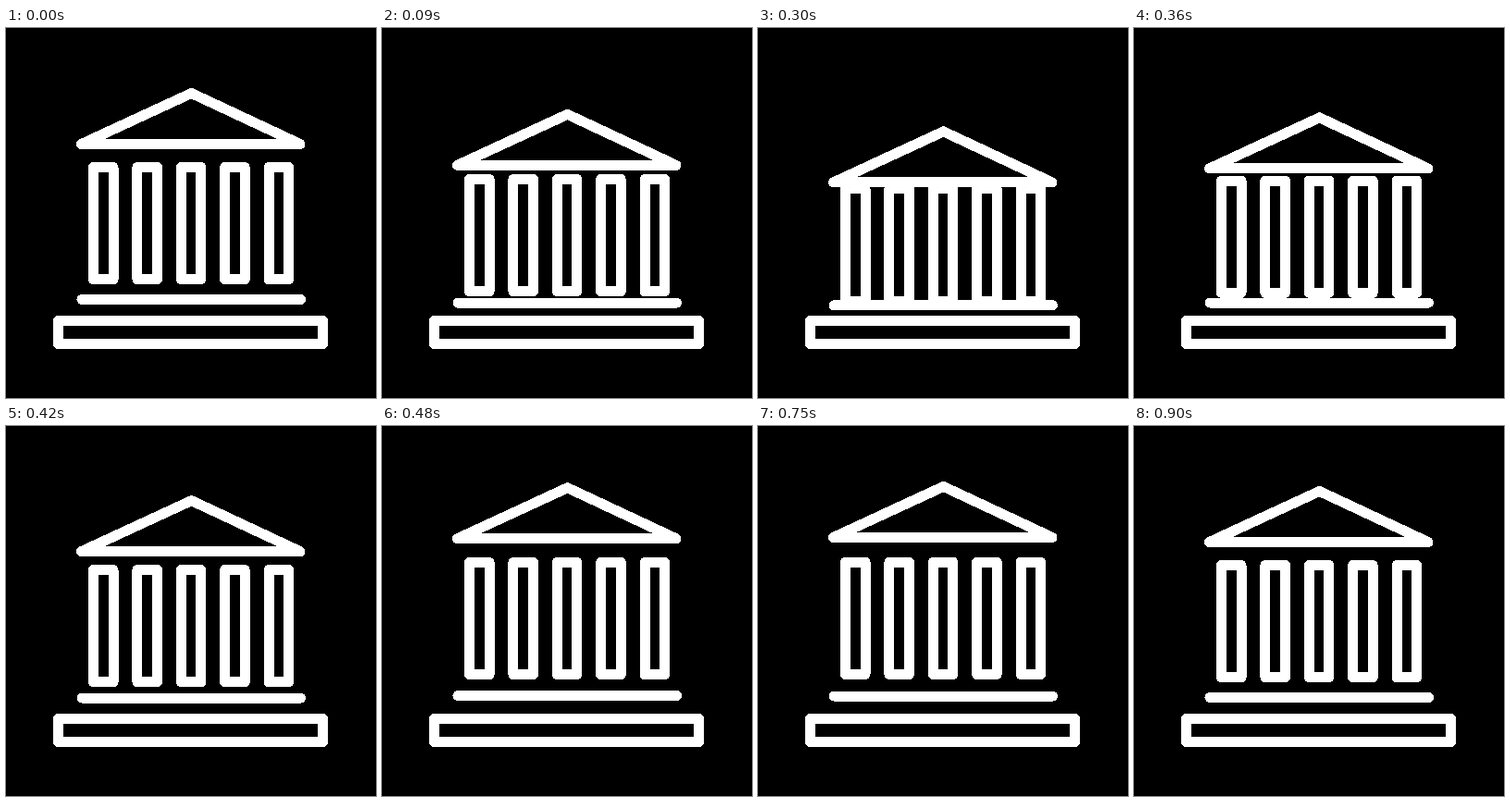
Animation, 400 px wide and 400 px high, one loop 1930 ms. Source, as an HTML page:

```html
<!DOCTYPE html>
<html lang="en">
<head>
<meta charset="utf-8">
<title>Bouncing temple icon</title>
<style>
  html, body { margin: 0; width: 100%; height: 100%; overflow: hidden; background: #000; }
  svg { display: block; width: 100%; height: 100%; }
</style>
</head>
<body>
<svg viewBox="0 0 400 400" fill="none" stroke="#fff" stroke-width="11" stroke-linejoin="round" stroke-linecap="round" shape-rendering="crispEdges">
  <path d="M56.5 316.5H342.5V341.5H56.5Z"/>
  <path id="step" d="M82 293.5H318.5"/>
  <path id="columns"/>
  <path id="roof" d="M81.5 125.5L200.5 70.5L318 125.5Z"/>
</svg>
<script>
const LOOP = 1930, STEP = 30;
const BOTTOM = 200, TOP = 561, REST = 900;

// Vertical offset of each part when squashed and when overshooting.
const parts = [
  { id: 'roof', low: 53.8, high: -12.2 },
  { id: 'columns', low: 30.5, high: -8 },
  { id: 'step', low: 8.5, high: -3.5 },
].map(part => ({ ...part, node: document.getElementById(part.id) }));

document.getElementById('columns').setAttribute('d',
  Array.from({ length: 5 }, (_, i) => `M${94.5 + 47.4 * i} 150.5h21.5v121.3h-21.5Z`).join(''));

function ease(t, start, end) {
  const u = Math.min(1, Math.max(0, (t - start) / (end - start)));
  return u * u * (3 - 2 * u);
}

function offset(t, low, high) {
  if (t < BOTTOM) return low * ease(t, 0, BOTTOM);
  if (t < TOP) return low + (high - low) * ease(t, BOTTOM, TOP);
  return high * (1 - ease(t, TOP, REST));
}

function draw(now) {
  const t = Math.floor((now % LOOP) / STEP) * STEP;
  for (const { node, low, high } of parts) {
    node.setAttribute('transform', `translate(0 ${offset(t, low, high).toFixed(2)})`);
  }
}

let origin;
function tick(now) {
  origin ??= now;
  draw(now - origin);
  requestAnimationFrame(tick);
}
draw(0);
requestAnimationFrame(tick);
</script>
</body>
</html>
```
